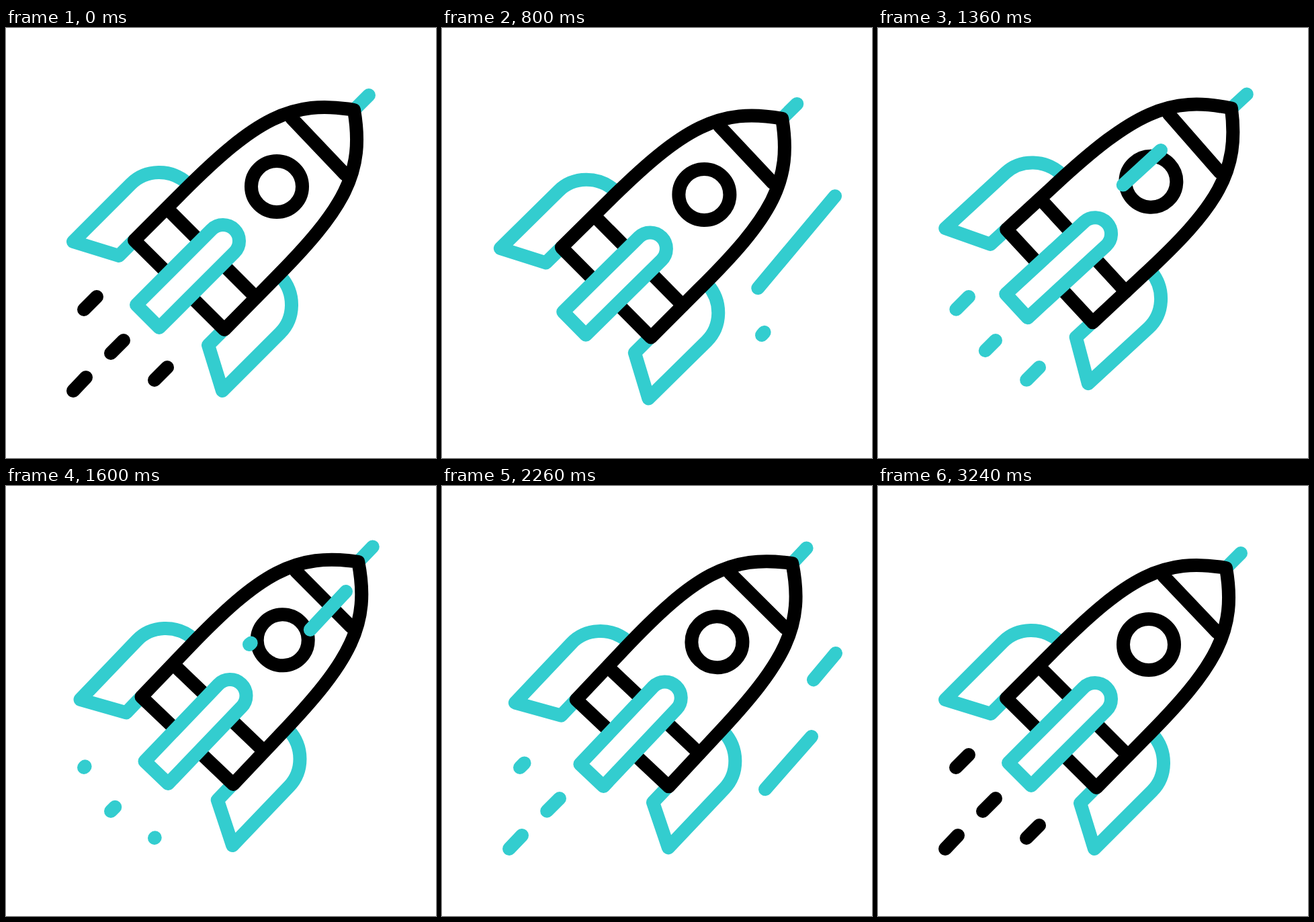
Animation, 640 px wide and 640 px high, one loop 3.52 s. Source, as an HTML page:

```html
<!DOCTYPE html>
<html lang="en">
<head>
<meta charset="utf-8">
<title>Rocket</title>
<style>
  html, body { margin: 0; width: 100%; height: 100%; overflow: hidden; background: #fff; }
  svg { display: block; width: 100%; height: 100%; }
  svg * { fill: none; stroke: #000; stroke-width: 20; stroke-linecap: round; stroke-linejoin: round; }
  svg .teal { stroke: #33cdcf; }
  svg .solid { fill: #fff; }
</style>
</head>
<body>
<svg viewBox="0 0 640 640">
  <g id="ship">
    <path id="fin" class="teal" d="M191 316L168 339L100 318L186 232C208 210 245 209 270 231"/>
    <use href="#fin" transform="matrix(0 -1 -1 0 640 640)"/>
    <path class="teal" d="M518 122L540 100"/>
    <path class="solid" d="M325 449L191 316L262 245C372 135 425 106 518 122C534 215 505 268 395 378Z"/>
    <path d="M425 134L505 218M240 269L372 401"/>
    <circle cx="403" cy="236" r="38"/>
    <path class="teal solid" d="M194 412L306 300A24 24 0 0 1 340 334L228 446Z"/>
  </g>
  <g id="lines"></g>
</svg>
<script>
const LOOP = 3520, START = 295, SWING = 168.5, SWINGS = 16, TRIM = 360;
const ship = document.getElementById('ship');
const lines = document.getElementById('lines');

const clamp = (v, lo = 0, hi = 1) => Math.min(hi, Math.max(lo, v));
const easeOut = (u, power = 3) => 1 - (1 - clamp(u)) ** power;

// Each run is [time the line starts to grow, time it starts to vanish].
const streaks = [
  { ends: [586, 249, 467, 391], runs: [[550, 800], [2224, 2468]] },
  { ends: [550, 373, 476, 457], runs: [[325, 573], [2048, 2293]] },
  { ends: [421, 182, 362, 236], runs: [[1130, 1370]] },
  { ends: [506, 157, 436, 232], runs: [[1465, 1710]] },
  { ends: [410, 155, 331, 226], runs: [[2420, 2670]] }
];
const dashes = [
  { ends: [135, 400, 116, 419], runs: [[1090, 1400], [1850, 2154]] },
  { ends: [175, 465, 156, 484], runs: [[1210, 1490], [1980, 2270]] },
  { ends: [240, 505, 221, 524], runs: [[1070, 1365], [1600, 1890]] },
  { ends: [119, 520, 100, 540], runs: [[1950, 2265]] }
];

for (const item of [...streaks, ...dashes]) {
  item.el = document.createElementNS('http://www.w3.org/2000/svg', 'path');
  lines.append(item.el);
}

function drawLine({ el, ends: [x1, y1, x2, y2] }, from, to, teal) {
  const at = k => `${x1 + (x2 - x1) * k} ${y1 + (y2 - y1) * k}`;
  const shown = to > 0 && from < 0.985;
  el.setAttribute('d', shown ? `M${at(from)}L${at(to)}` : '');
  el.setAttribute('class', teal ? 'teal' : '');
}

function drawRuns(item, t) {
  const run = item.runs.find(([, out]) => t < out + TRIM);
  if (!run) return drawLine(item, 0, 0, true);
  drawLine(item, easeOut((t - run[1]) / TRIM), easeOut((t - run[0]) / TRIM), true);
}

function drawDash(item, t) {
  if (t < 320 + TRIM) drawLine(item, easeOut((t - 320) / TRIM), 1, false);
  else if (t > 2500 && t > item.runs.at(-1)[1] + TRIM) drawLine(item, 0, easeOut((t - 2500) / 700, 2), false);
  else drawRuns(item, t);
}

// The ship swings along its axis and tilts a quarter turn out of phase.
function moveShip(t) {
  const u = clamp((t - START) / SWING, 0, SWINGS);
  const angle = Math.PI * u;
  const wave = 0.94 * Math.cos(angle) + 0.06 * Math.cos(3 * angle);
  const shift = 12.3 * (u < 1 || u > SWINGS - 1 ? (wave - 1) / 2 : wave);
  const settle = clamp(Math.min(u, SWINGS - u));
  const tilt = 0.4 * settle + 2.3 * Math.sin(angle);
  ship.setAttribute('transform', `translate(${shift} ${-shift}) rotate(${tilt} 451 188)`);
}

const begin = performance.now();
function frame() {
  const t = (performance.now() - begin) % LOOP;
  moveShip(t);
  streaks.forEach(s => drawRuns(s, t));
  dashes.forEach(d => drawDash(d, t));
  requestAnimationFrame(frame);
}
frame();
</script>
</body>
</html>
```
